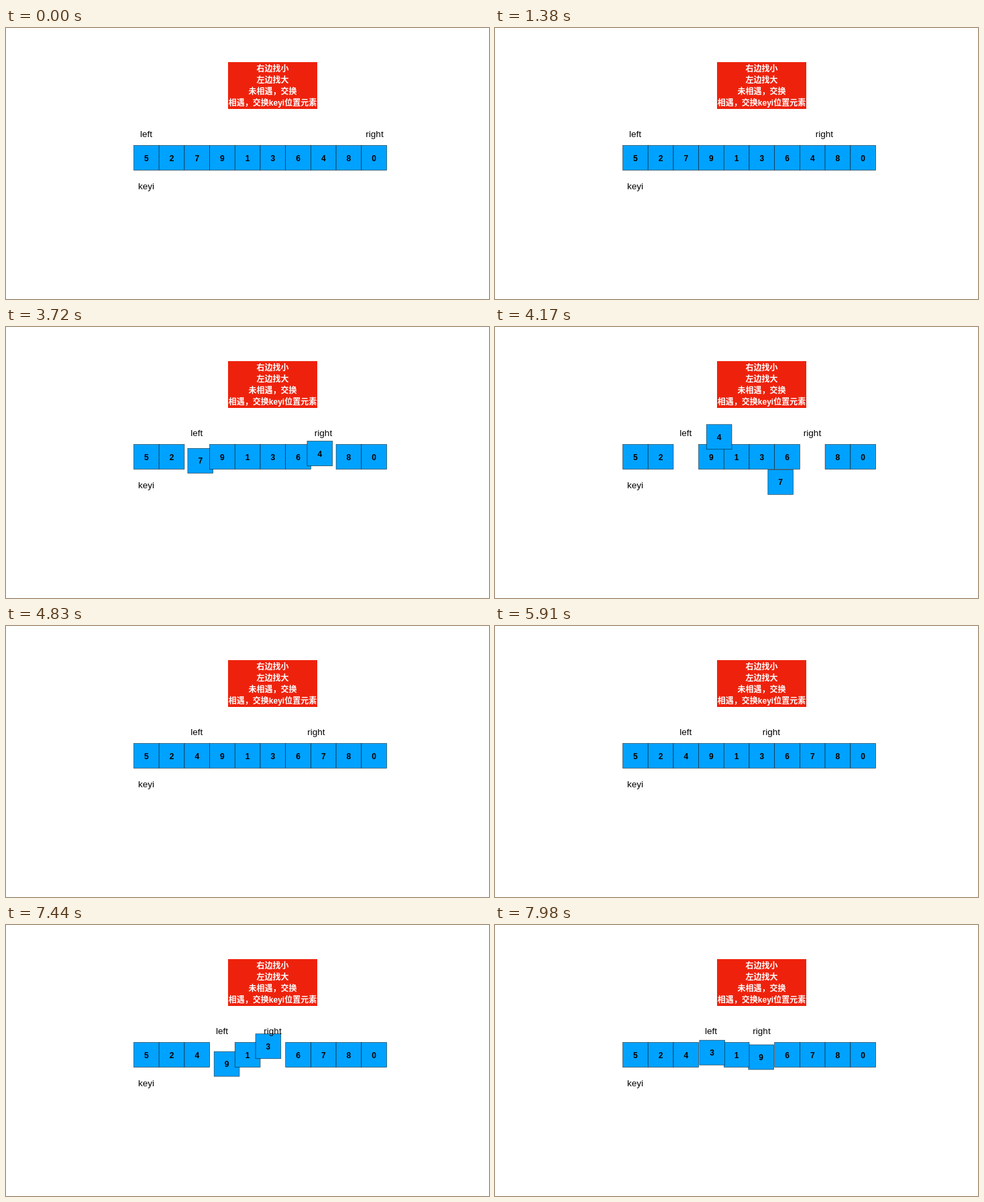
Write an HTML page with a canvas that moves like this. It is 720 px wide and 405 px high and loops after 8 s.

```html
<!DOCTYPE html>
<html lang="zh-CN">
<head>
<meta charset="utf-8">
<title>Partition steps</title>
<style>
html, body { margin: 0; width: 100%; height: 100%; overflow: hidden; background: #fff; }
canvas { display: block; width: 720px; height: 405px; }
</style>
</head>
<body>
<canvas id="stage" width="720" height="405"></canvas>
<script>
const ctx = document.getElementById('stage').getContext('2d');
const LOOP = 8000, TICK = 30, MOVE = 900;
const LATIN = '"Liberation Sans", Arial';
const CJK = '"Noto Sans CJK SC", "Noto Sans CJK", sans-serif';

const X0 = 190.5, Y0 = 175.5, CELL = 37.7, HEIGHT = 37;
const digits = [5, 2, 7, 9, 1, 3, 6, 4, 8, 0];
const rules = ['右边找小', '左边找大', '未相遇，交换', '相遇，交换keyi位置元素'];

// Each label visits its stops; every move begins at a multiple of MOVE.
const rightStops = [549.5, 511.5, 473, 435, 397.5];
const rightSlots = [0, 1, 5, 6];
const leftStops = [209, 246.6, 284.3, 322];
const leftSlots = [2, 3, 7];
const LINEAR_SLOT = 1;

const swaps = [
  { slot: 4, a: 2, b: 7, down: 48, up: 37, lean: 0.27 },
  { slot: 8, a: 3, b: 5, down: 30, up: 27, lean: 0.16 }
];

const clamp = v => Math.min(1, Math.max(0, v));
const bez = (s, p1, p2) => 3 * s * (1 - s) ** 2 * p1 + 3 * s * s * (1 - s) * p2 + s ** 3;

function easeInOut(u) {
  if (u <= 0 || u >= 1) return clamp(u);
  let lo = 0, hi = 1;
  for (let i = 0; i < 24; i++) {
    const mid = (lo + hi) / 2;
    if (bez(mid, 0.42, 0.58) < u) lo = mid; else hi = mid;
  }
  return bez(lo, 0, 1);
}

function progress(t, slot) {
  const u = clamp((t - slot * MOVE) / MOVE);
  return slot === LINEAR_SLOT ? u : easeInOut(u);
}

function labelX(t, stops, slots) {
  return slots.reduce((x, slot, i) => x + (stops[i + 1] - stops[i]) * progress(t, slot), stops[0]);
}

// Arc from (0,0) to (width,0), sampled so it can be walked at even speed.
function makeArc(width, peak, lean) {
  const n = 120, pts = [{ x: 0, y: 0, len: 0 }];
  for (let i = 1; i <= n; i++) {
    const s = i / n, last = pts[i - 1];
    const x = width * bez(s, lean, 1 - lean), y = 4 * peak * s * (1 - s);
    pts.push({ x, y, len: last.len + Math.hypot(x - last.x, y - last.y) });
  }
  return p => {
    const goal = p * pts[n].len;
    let i = 1;
    while (i < n && pts[i].len < goal) i++;
    const a = pts[i - 1], b = pts[i], k = (goal - a.len) / (b.len - a.len);
    return { x: a.x + (b.x - a.x) * k, y: a.y + (b.y - a.y) * k };
  };
}

for (const s of swaps) {
  const width = (s.b - s.a) * CELL;
  s.lower = makeArc(width, s.down, s.lean);
  s.upper = makeArc(-width, -s.up, s.lean);
}

function text(str, x, y, font, color) {
  ctx.font = font;
  ctx.fillStyle = color;
  ctx.fillText(str, x, y);
}

function label(str, x, y) {
  text(str, x, y, `13.5px ${LATIN}, sans-serif`, '#000');
}

function tile(i, t) {
  let x = X0 + i * CELL, y = Y0;
  for (const s of swaps) {
    if (i !== s.a && i !== s.b) continue;
    const d = (i === s.a ? s.lower : s.upper)(progress(t, s.slot));
    x += d.x;
    y += d.y;
  }
  ctx.fillStyle = '#00a2ff';
  ctx.fillRect(x, y, CELL, HEIGHT);
  ctx.lineWidth = 0.75;
  ctx.strokeStyle = 'rgba(0,0,0,0.65)';
  ctx.strokeRect(x, y, CELL, HEIGHT);
  text(digits[i], x + CELL / 2, y + 23, `bold 12px ${LATIN}, sans-serif`, '#000');
}

function draw(t) {
  ctx.fillStyle = '#fff';
  ctx.fillRect(0, 0, 720, 405);
  ctx.textAlign = 'center';

  ctx.fillStyle = '#ee220c';
  ctx.fillRect(331, 51, 133, 70);
  rules.forEach((line, i) => text(line, 397.5, 65.4 + i * 17, `bold 12px ${LATIN}, ${CJK}`, '#fff'));

  digits.forEach((_, i) => tile(i, t));
  label('left', labelX(t, leftStops, leftSlots), 162.8);
  label('right', labelX(t, rightStops, rightSlots), 162.8);
  label('keyi', 209, 240.8);
}

const start = performance.now();
function frame() {
  const t = (performance.now() - start) % LOOP;
  draw(Math.floor(t / TICK) * TICK);
  requestAnimationFrame(frame);
}
frame();
</script>
</body>
</html>
```
